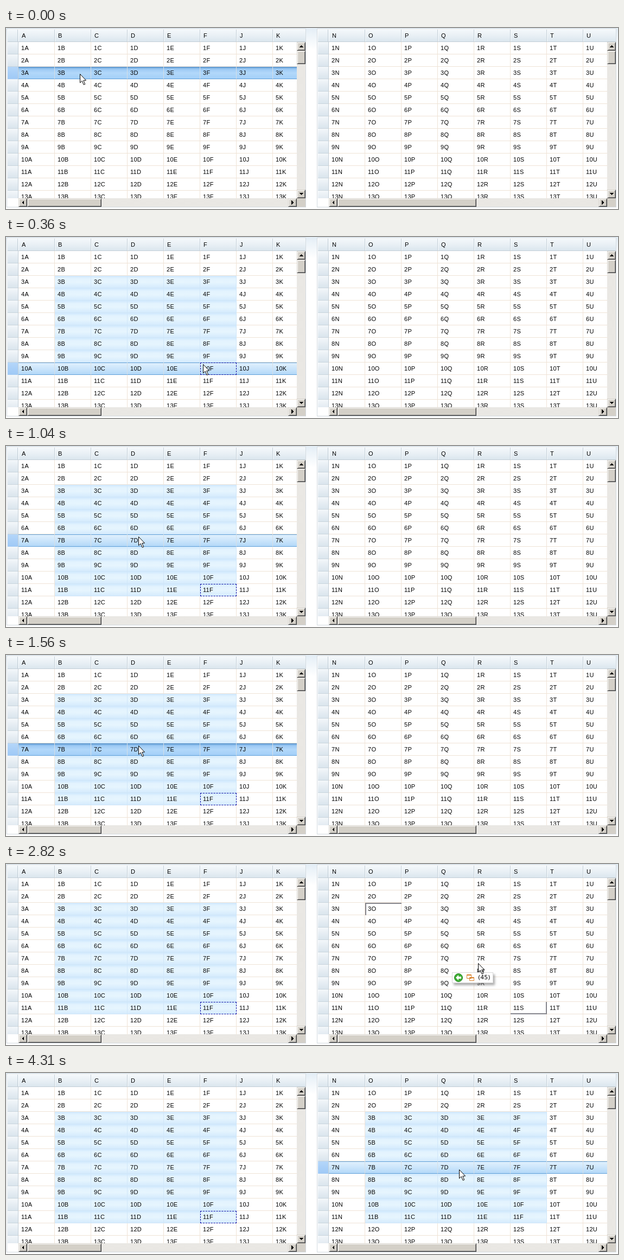
These frames come from a looping animation (1128 px wide and 336 px high, 5370 ms). An HTML page:

```html
<!DOCTYPE html>
<html lang="en">
<head>
<meta charset="utf-8">
<title>Dragging cells between two grids</title>
<style>
html, body { margin: 0; width: 1128px; height: 336px; overflow: hidden; }
body { position: relative; background: linear-gradient(#e4eef6, #fff 40px); font: 11px/23px "Liberation Sans", Arial, sans-serif; color: #000; }
div, svg { position: absolute; box-sizing: border-box; }
.pane { top: 1px; width: 552px; height: 332px; border: 1px solid #d3dae0; background: #fff; }
.head { left: 1px; top: 1px; width: 549px; height: 23px; overflow: hidden; background: linear-gradient(#f4f8fb, #e9f0f5 50%, #dbe6ee); border-bottom: 1px solid #c3ced6; }
.head div { top: 0; height: 22px; width: 67px; padding-left: 6px; border-right: 1px solid #c3ced6; box-shadow: inset 1px 0 #f8fbfd; line-height: 22px; letter-spacing: .3px; }
.side { left: 1px; top: 24px; width: 20px; height: 290px; overflow: hidden; border-right: 1px solid #c3ced6; }
.side div { left: 0; width: 19px; height: 23px; background: linear-gradient(#f3f7fa, #e6edf3 50%, #dae5ed); border-bottom: 1px solid #c9d4dc; }
.side .on { background: linear-gradient(#b4d6f9, #9fc9f6); border-color: #a6cbf2; }
.view { left: 21px; top: 24px; width: 513px; height: 290px; overflow: hidden; }
.row { left: 0; width: 536px; height: 23px; }
.cell { top: 0; width: 67px; height: 23px; padding-left: 5px; letter-spacing: .3px; border: solid #efe3d6; border-width: 0 1px 1px 0; white-space: nowrap; }
.cell.sel { background: linear-gradient(#cfe8fd, #e3f3fe 25%, #e6f5fe 55%, #d5ebfd); border-color: #d0e6f8; }
.row.hover { background: linear-gradient(#5f9fd8 1px, #e0f0fd 1px, #cbe5fb 50%, #b3d8f8 22px, #5f9fd8 22px); }
.row.press { background: linear-gradient(#5a94cc 1px, #7db2e4 2px, #9fcbf5 5px, #b2d8fa 50%, #a3cff8 22px, #5f9fd8 22px); }
.hover .cell, .press .cell { border-bottom-color: transparent; }
.hover .cell.sel, .press .cell.sel { background: none; }
.hover .cell, .press .cell, .hover .cell.sel, .press .cell.sel { border-right-color: #d6dfe5; }
.focus::after, .tl::before, .br::before { content: ""; position: absolute; inset: 0 -1px -1px 0; }
.focus::after { border: 1px dashed #0a0aa4; }
.tl::before { border: solid #85858c; border-width: 2px 0 0 2px; }
.br::before { border: solid #85858c; border-width: 0 2px 2px 0; }
.track { background: repeating-conic-gradient(#d4d0c8 0 25%, #fff 0 50%) 0 0 / 2px 2px; }
.btn { background: #d4d0c8; border: 1px solid; border-color: #d4d0c8 #404040 #404040 #d4d0c8; box-shadow: inset 1px 1px #fff, inset -1px -1px #808080; }
.btn svg { left: 3px; top: 3px; }
#tip { width: 76px; height: 20px; background: #fff; border: 1px solid #d8d8d8; box-shadow: 3px 4px 4px rgba(120, 120, 120, .6); font: 11px/18px "DejaVu Sans", Verdana, sans-serif; }
#tip span { position: absolute; left: 47px; top: 0; }
#tip svg { left: -1px; top: -1px; }
#tip, #cursor { left: 0; top: 0; }
</style>
</head>
<body>
<script>
const LOOP = 5370, ROWS = 13, COL = 67, ROW = 23;

function add(parent, cls, box = {}, html = "") {
  const el = document.createElement("div");
  el.className = cls;
  for (const k in box) el.style[k] = box[k] + "px";
  el.innerHTML = html;
  parent.append(el);
  return el;
}

function button(parent, left, top, turn) {
  add(parent, "btn", { left, top, width: 16, height: 16 },
    `<svg width="8" height="8" viewBox="-4 -4 8 8" shape-rendering="crispEdges"><path d="M-4 2L0-2L4 2Z" transform="rotate(${turn})"/></svg>`);
}

function makePane(x, letters, thumb) {
  const el = add(document.body, "pane", { left: x + 1 });
  const head = add(el, "head"), side = add(el, "side"), view = add(el, "view");
  add(head, "", { left: -48 });
  [...letters].forEach((c, i) => add(head, "", { left: 20 + COL * i }, c));
  const pane = { x, letters, rows: [], sides: [], cells: [] };
  for (let r = 0; r < ROWS; r++) {
    const top = ROW * r, row = add(view, "row", { top });
    pane.rows.push(row);
    pane.sides.push(add(side, "", { top }));
    pane.cells.push([...letters].map((c, i) => add(row, "cell", { left: COL * i }, r + 1 + c)));
  }
  add(el, "track", { left: 534, top: 24, width: 16, height: 290 });
  add(el, "track", { left: 21, top: 314, width: 513, height: 16 });
  add(el, "", { left: 534, top: 314, width: 16, height: 16 }).style.background = "#d4d0c8";
  button(el, 534, 24, 0);
  button(el, 534, 298, 180);
  button(el, 21, 314, -90);
  button(el, 518, 314, 90);
  add(el, "btn", { left: 534, top: 40, width: 16, height: 25 });
  add(el, "btn", { left: 37, top: 314, width: thumb, height: 16 });
  return pane;
}

const left = makePane(0, "ABCDEFJK", 137);
const right = makePane(572, "NOPQRSTU", 256);

const tip = add(document.body, "", {}, `<svg width="46" height="20">
  <circle cx="12" cy="10" r="7.5" fill="#3fae35" stroke="#23831f"/>
  <path d="M7 10l5-5v3h5v4h-5v3z" fill="#fff"/>
  <g fill="#fff" stroke="#d8822e"><path d="M27.5 4.5h8v7h-8zM32.500 9.500h8v6h-8z"/><path d="M27.500 5.500h8M32.500 10.500h8"/></g>
  </svg><span>(45)</span>`);
tip.id = "tip";
const icons = tip.querySelector("svg");

const cursor = add(document.body, "", {}, `<svg width="14" height="23">
  <path d="M.5 .5V16.700L4.200 13.200L7.200 20.300L9.700 19.300L6.800 12.400L11.500 12.200Z" fill="#fff" stroke="#000"/></svg>`);
cursor.id = "cursor";

// Pointer track: one entry per step
const track = [];
const at = (t, x, y) => track.push({ t, x, y });
function glide(t, n, x, y, ease) {
  const a = track.at(-1);
  for (let k = 1; k <= n; k++) {
    const p = ease(k / n);
    at(t + 60 * (k - 1), Math.round(a.x + (x - a.x) * p), Math.round(a.y + (y - a.y) * p));
  }
}
const easeOut = p => 1 - (1 - p) ** 1.5;
const snap = p => p ** 5 / (p ** 5 + (1 - p) ** 5);

at(0, 136, 85);
glide(60, 9, 417, 272, easeOut);
at(600, 418, 273);
glide(800, 6, 244, 168, snap);
[250, 268, 300, 350, 430, 524, 575, 593, 625].forEach((x, i) =>
  at(2160 + 60 * i, x, Math.min(184, 169 + 3 * i)));
track.at(-5).y = track.at(-4).y = 181;
glide(2700, 4, 905, 184, easeOut);
at(2940, 905, 184);
glide(3270, 3, 835, 179, easeOut);
at(3520, 835, 179);

const paneAt = x => x >= 23 && x < 536 ? left : x >= 595 && x < 1108 ? right : null;
const colAt = (p, x) => Math.floor((x - p.x - 23) / COL);
const rowAt = y => Math.floor((y - 26) / ROW);

let marked = [];
function mark(el, cls) {
  if (!el) return;
  el.classList.add(cls);
  marked.push([el, cls]);
}
function markRow(pane, r, cls) {
  mark(pane.rows[r], cls);
  mark(pane.sides[r], "on");
}
function select(pane, r1, c1) {
  for (let r = 2; r <= r1; r++)
    for (let c = 1; c <= c1; c++) mark(pane.cells[r][c], "sel");
}
function place(el, x, y) {
  el.style.transform = `translate(${x}px,${y}px)`;
}

function render(t) {
  marked.forEach(([el, cls]) => el.classList.remove(cls));
  marked = [];
  const i = track.findLastIndex(s => s.t <= t);
  const now = track[i], prev = track[Math.max(0, i - 1)];

  // Selection, which the visible arrow joins late
  const shown = t < 240 ? track[0] : now;
  place(cursor, shown.x, shown.y);
  if (t >= 60) {
    const r = t < 600 ? rowAt(now.y) : 10, c = t < 600 ? colAt(left, now.x) : 5;
    select(left, r, c);
    mark(left.cells[r][c], "focus");
  }

  // Row under the pointer
  const pane = paneAt(now.x);
  const pressed = t < 60 || (t >= 1560 && t < 2160);
  if (pane && (t < 2820 || t >= 4310)) markRow(pane, rowAt(now.y), pressed ? "press" : "hover");

  // Drag label and drop corners trail the pointer by one step
  const drag = t >= 2160 && t < 4120 && prev.x >= 424;
  tip.style.display = drag ? "block" : "none";
  if (drag) {
    place(tip, prev.x + 16, prev.y + 17);
    const target = paneAt(prev.x);
    icons.style.display = target === right ? "block" : "none";
    if (target) {
      const c = colAt(target, prev.x), r = rowAt(prev.y);
      mark(target.cells[r - 4][c - 2], "tl");
      mark(target.cells[r + 4][c + 2], "br");
    }
  }

  // Dropped values
  const dropped = t >= 4180;
  for (let r = 2; r <= 10; r++)
    for (let c = 1; c <= 5; c++)
      right.cells[r][c].textContent = r + 1 + (dropped ? left : right).letters[c];
  if (t >= 4310) select(right, 10, 5);
}

const changes = [...track.map(s => s.t), 1560, 2160, 2820, 4120, 4180, 4310].sort((a, b) => a - b);
let last = -1;
function frame() {
  const t = performance.now() % LOOP;
  const step = changes.findLast(c => c <= t);
  if (step !== last) render(last = step);
  requestAnimationFrame(frame);
}
frame();
</script>
</body>
</html>
```
